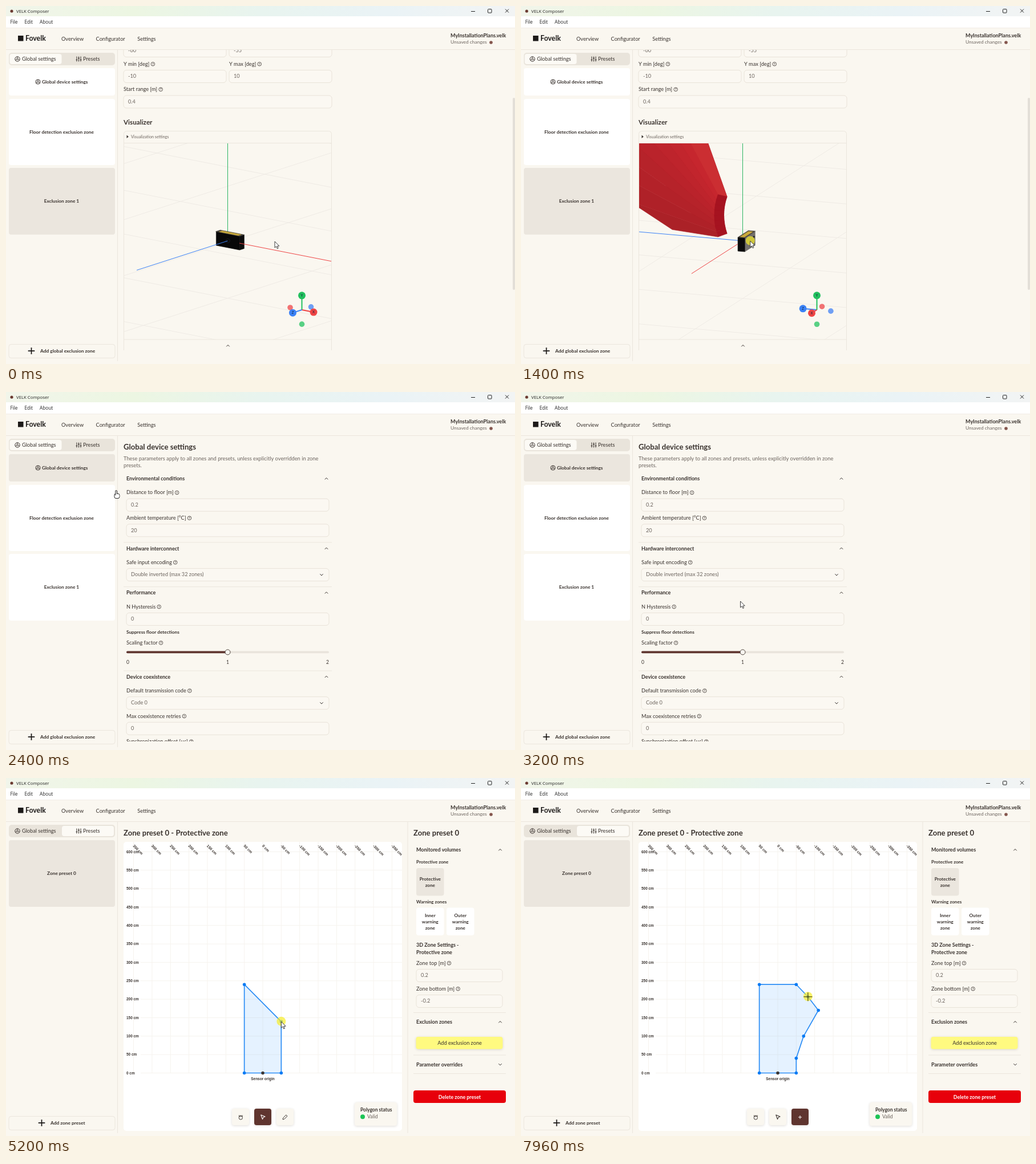
Recreate the animation shown at these times as an HTML page with a canvas. Size 892 px wide and 628 px high, loop 8000 ms.

```html
<!DOCTYPE html>
<html lang="en">
<head>
<meta charset="utf-8">
<title>Zone configurator</title>
<style>
  html, body { margin: 0; width: 100%; height: 100%; overflow: hidden; background: #faf7f0; }
  canvas { display: block; width: 892px; height: 628px; }
</style>
</head>
<body>
<canvas id="stage"></canvas>
<script>
const LOOP = 8000, W = 892, H = 628, RAD = Math.PI / 180;
const BG = '#faf7f0', INK = '#39322e', SOFT = '#6c645e', EDGE = '#ebe6dd', PICKED = '#ebe6de', BROWN = '#5f352f';
const canvas = document.getElementById('stage'), g = canvas.getContext('2d');
const ratio = window.devicePixelRatio || 1;
canvas.width = W * ratio;
canvas.height = H * ratio;

// ---------- drawing helpers ----------
function text(s, x, y, { size = 9.2, weight = 400, color = INK, align = 'left', font = 'Lato' } = {}) {
  g.font = `${weight} ${size}px "${font}", sans-serif`;
  g.textAlign = align;
  g.fillStyle = color;
  g.fillText(s, x, y + size * 0.35);
  return g.measureText(s).width;
}
const bold = (s, x, y, size = 9, more) => text(s, x, y, { size, weight: 700, ...more });
const row = (names, x, y, gap, style) => names.forEach(s => { x += text(s, x, y, style) + gap; });

function box(x, y, w, h, fill, edge, r = 4) {
  g.beginPath();
  g.roundRect(x, y, w, h, r);
  if (fill) { g.fillStyle = fill; g.fill(); }
  if (edge) { g.strokeStyle = edge; g.lineWidth = 1; g.stroke(); }
}
function path(points, color, width = 1, { fill, close } = {}) {
  g.beginPath();
  points.forEach(p => g.lineTo(...p));
  if (close || fill) g.closePath();
  if (fill) { g.fillStyle = fill; g.fill(); }
  if (color) { g.strokeStyle = color; g.lineWidth = width; g.stroke(); }
}
const line = (x1, y1, x2, y2, color = EDGE, width = 1) => path([[x1, y1], [x2, y2]], color, width);
function dot(x, y, r, fill, edge, width = 1) {
  g.beginPath();
  g.arc(x, y, r, 0, 7);
  if (fill) { g.fillStyle = fill; g.fill(); }
  if (edge) { g.strokeStyle = edge; g.lineWidth = width; g.stroke(); }
}
function plus(x, y, r, color, width) {
  line(x - r, y, x + r, y, color, width);
  line(x, y - r, x, y + r, color, width);
}
const chevron = (x, y, d = 1) => path([[x - 2.7, y + d * 1.4], [x, y - d * 1.4], [x + 2.7, y + d * 1.4]], INK);
function clipped(x, y, w, h, draw) {
  g.save();
  g.beginPath();
  g.rect(x, y, w, h);
  g.clip();
  draw();
  g.restore();
}
function raised(x, y, w, h, fill) {
  g.save();
  g.shadowColor = 'rgba(80,60,40,.18)';
  g.shadowBlur = 4;
  g.shadowOffsetY = 1;
  box(x, y, w, h, fill);
  g.restore();
}

// ---------- gestures: they move the pointer, the camera and the polygon ----------
const OX = 450, OY = 517.5, SCALE = 0.647;
const cm = (x, y) => [OX + x * SCALE, OY - y * SCALE];
const drag = (start, end, from, to = from) => ({ start, end, from, to, press: true });
const click = (time, x, y) => drag(time, time + 100, [x, y]);
const hover = (time, x, y) => ({ start: time, end: time, from: [x, y], to: [x, y] });

const orbit = drag(120, 1600, [471, 413], [391, 412]);
const openSettings = click(2160, 120, 136), openPresets = click(3560, 146, 96), openZone = click(3980, 136.5, 148);
const liftLeft = drag(4640, 4880, cm(-50, 50), cm(-50, 240));
const liftRight = drag(5060, 5360, cm(50, 50), cm(50, 240));
const pickPen = click(5720, 487, 592);
const inserts = [
  drag(6260, 6400, cm(50, 40)),
  drag(6700, 6960, cm(50, 100), cm(70, 100)),
  drag(7220, 7640, cm(60, 170), cm(110, 170)),
  drag(7880, LOOP, cm(80, 205), cm(82.5, 207.5))];
const gestures = [orbit, hover(1880, 401.5, 414.5), openSettings, hover(2500, 235, 195), hover(3200, 384.5, 367),
  openPresets, openZone, hover(4200, 136.5, 148), liftLeft, liftRight, pickPen, ...inserts];

const mix = (a, b, k) => a.map((v, i) => v + (b[i] - v) * k);
const smooth = k => k * k * (3 - 2 * k);
const during = ({ start, end, from, to }, t) =>
  mix(from, to, Math.min(1, Math.max(0, (t - start) / (end - start || 1))));

function pointerAt(t) {
  const i = gestures.findIndex(q => t < q.end), next = gestures[i], last = gestures[i - 1];
  if (t >= next.start || !last) return during(next, t);
  return mix(last.to, next.from, smooth((t - last.end) / (next.start - last.end)));
}

// ---------- form parts ----------
function label(s, x, y) {
  const cx = x + text(s, x, y) + 6;
  dot(cx, y + 0.3, 3.3, null, INK, 0.8);
  bold('?', cx, y + 0.4, 5.5, { align: 'center' });
}
function input(s, x, y, w, select) {
  box(x, y - 10.5, w, 22, '#fbf8f2', '#e9e3d9', 5);
  text(s, x + 8, y, { color: SOFT });
  if (select) chevron(x + w - 13, y + 0.5, -1);
}
function section(s, x, y, right, d = 1) {
  bold(s, x, y);
  chevron(right, y, d);
}
function card(s, y, h, picked) {
  box(5, y, 186, h, picked ? PICKED : '#fff');
  bold(s, 97.5, y + h / 2, 8.3, { align: 'center' });
}
function gear(x, y, r) {
  dot(x, y, r, null, INK);
  dot(x, y, r * 0.35, null, INK, 0.8);
  for (let a = 0.5; a < 6; a += Math.PI * 2 / 3) {
    const c = r * Math.cos(a), s = r * Math.sin(a);
    line(x + c * 0.4, y + s * 0.4, x + c, y + s, INK, 0.9);
  }
}

// ---------- frame of the window ----------
function chrome() {
  g.fillStyle = BG;
  g.fillRect(0, 0, W, H);
  const bar = g.createLinearGradient(0, 0, W, 0);
  ['#f1f5ea', '#ecf6e2', '#e8f4ef', '#eaf3f6', '#f2f4f4'].forEach((c, i) => bar.addColorStop(i / 4, c));
  g.fillStyle = bar;
  g.fillRect(0, 0, W, 18);
  g.fillStyle = '#fff';
  g.fillRect(0, 18, W, 20);
  line(0, 38.5, W, 38.5, '#f1ede6');
  line(0, 76.5, W, 76.5);
  line(195.5, 77, 195.5, 623);

  const system = { size: 8.2, font: 'Open Sans', color: '#222' };
  dot(10, 9, 2.6, '#6b3a31');
  text('VELK Composer', 18, 9, { ...system, size: 7.8 });
  row(['File', 'Edit', 'About'], 7.5, 28.5, 12, system);
  line(815, 9.5, 822, 9.5, '#222');
  box(844.5, 5.5, 6.5, 6.5, null, '#222', 1);
  line(875, 5.5, 881, 11.5, '#222');
  line(881, 5.5, 875, 11.5, '#222');

  box(21, 52, 9.5, 9.5, '#1d1a19', null, 0);
  bold('Fovelk', 34, 57, 12.3, { color: '#1d1a19' });
  row(['Overview', 'Configurator', 'Settings'], 97, 57.5, 21.5);
  bold('MyInstallationPlans.velk', 779, 51.5);
  text('Unsaved changes', 779, 63.5, { size: 8.4, color: SOFT });
  dot(850, 64, 2.8, '#85564d');
}

function sidebar(presets, picked) {
  box(5, 82, 186, 22, '#e9e4db', null, 5);
  box(presets ? 98 : 6.5, 84, 91, 18, '#fcfaf5', null, 4);
  gear(20, 93, 4.2);
  text('Global settings', 28, 93);
  for (let i = -1; i <= 1; i++) {
    const x = 127.5 + i * 3.5, y = 91.5 + Math.abs(i) * 3;
    line(x, 88.5, x, 97.5, INK);
    line(x - 1.5, y, x + 1.5, y, INK);
  }
  text('Presets', 135, 93);
  if (presets) {
    card('Zone preset 0', 109, 117, picked);
  } else {
    card('', 109, 48, picked === 0);
    gear(56, 133, 4);
    bold('Global device settings', 63, 133, 8.3);
    card('Floor detection exclusion zone', 163, 116);
    card('Exclusion zone 1', 284, 117, picked === 1);
  }
  box(5, 593.5, 186, 24, null, EDGE);
  plus(presets ? 62.5 : 44.5, 605, 5.8, '#1d1a19', 1.8);
  bold(presets ? 'Add zone preset' : 'Add global exclusion zone', presets ? 78 : 60, 605, 8.4);
}

// ---------- 3D visualizer (orthographic) ----------
function scene(turn, pitch) {
  const c = Math.cos(turn * RAD), s = Math.sin(turn * RAD), up = Math.cos(pitch * RAD), tilt = Math.sin(pitch * RAD);
  const projector = (cx, cy, k) => (x, y, z) => [cx + k * (x * c - z * s), cy + k * (tilt * (x * s + z * c) - y * up)];
  const P = projector(388.5, 412, 1);
  const face = (fill, ...corners) => path(corners, fill, 0.6, { fill });

  const far = 1200, floor = -104;
  for (let i = -far; i <= far; i += 240) {
    path([P(-far, floor, i), P(far, floor, i)], '#efebe5');
    path([P(i, floor, -far), P(i, floor, far)], '#efebe5');
  }

  // Exclusion beam: a spherical wedge that reaches farthest at its middle height
  const near = 195, low = -20, high = 20, left = 55, right = 60, step = 5;
  const reach = v => near * (2.85 + 6 * (1 - Math.abs(v) / high));
  const B = (h, v, r) => {
    const flat = r * Math.cos(h * RAD);
    return P(-r * Math.sin(h * RAD), flat * Math.sin(v * RAD), flat * Math.cos(v * RAD));
  };
  const strips = draw => { for (let v = low; v < high; v += step) draw(v, v + step); };
  const side = (h, shade) => strips((v, w) => face(shade(v), B(h, v, near), B(h, w, near), B(h, w, reach(w)), B(h, v, reach(v))));
  side(right, () => '#96071a');
  side(left, v => `hsl(357 68% ${43.5 + v * 0.18}%)`);
  face('#cb2e32', B(left, high, near), B(right, high, near), B(right, high, reach(high)), B(left, high, reach(high)));
  strips((v, w) => face('#a61320', B(left, v, near), B(right, v, near), B(right, w, near), B(left, w, near)));

  const axis = (from, to, color) => path([P(...from), P(...to)], color);
  const blue = () => axis([0, 0, 0], [0, 0, 259], '#3b82f6');
  axis([0, 0, 0], [0, 259, 0], '#2bb463');
  if (c < 0) blue();

  // Sensor body
  const L = -27, R = 26, h = 12.5, front = -0.6, back = -13.6, z = c > 0 ? front : back;
  const flat = (x1, x2, z1, z2) => [P(x1, h, z1), P(x2, h, z1), P(x2, h, z2), P(x1, h, z2)];
  const upright = (x, y, z) => [P(-x, -y, z), P(x, -y, z), P(x, y, z), P(-x, y, z)];
  face(c > 0 ? '#080808' : '#73706c', ...upright(R, h, z));
  face('#0b0b0b', P(R, -h, front), P(R, -h, back), P(R, h, back), P(R, h, front));
  face('#45403a', ...flat(L, R, front, back));
  face('#cbab3c', ...flat(-21, 21, -3, -11));
  if (c > 0) {
    dot(...P(0, 0, front), 3.5, null, '#1f2630', 0.7);
    blue();
  } else {
    dot(...P(-20, 4, back), 1.6, '#222');
  }
  axis([R, 0, 0], [259, 0, 0], '#ee4444');

  // Orientation gizmo
  const G = projector(518.5, 533, 26);
  [['X', [1, 0, 0], '#ef4444', '#f17272'], ['Y', [0, 1, 0], '#22c05e', '#59d084'], ['Z', [0, 0, 1], '#3b82f6', '#6f9ff4']]
    .flatMap(([name, v, color, pale]) => [{ name, v, color }, { v: v.map(n => -n), color: pale }])
    .map(o => ({ ...o, depth: up * (o.v[0] * s + o.v[2] * c) + tilt * o.v[1] }))
    .sort((m, n) => m.depth - n.depth)
    .forEach(({ name, v, color }) => {
      const p = G(...v);
      if (name) path([[518.5, 533], p], color, 2);
      dot(...p, name ? 6.5 : 4.8, color);
      if (name) text(name, ...p, { size: 6.5, color: '#10243a', align: 'center', font: 'Inter' });
    });
}

function visualizer(t) {
  const [x, y] = during(orbit, t), degrees = 360 / 345;
  clipped(197, 77, 695, 527, () => {
    input('-60', 206, 78, 180);
    input('-55', 391, 78, 180);
    label('Y min [deg]', 206, 101.5);
    label('Y max [deg]', 391, 101.5);
    input('-10', 206, 123, 180);
    input('10', 391, 123, 180);
    label('Start range [m]', 206, 146);
    input('0.4', 206, 167.5, 365);
    bold('Visualizer', 206, 204, 11.7);
    box(206.5, 219.5, 364, 420, null, EDGE, 5);
    path([[211.5, 226.5], [214.8, 229.2], [211.5, 232]], null, 1, { fill: INK });
    text('Visualization settings', 219, 229, { size: 7.2, color: SOFT });
    clipped(207, 240, 363, 345, () => scene(38 + (orbit.from[0] - x) * degrees, 14.6 - (orbit.from[1] - y) * degrees));
    line(206, 240.5, 571, 240.5);
    line(206, 585, 571, 585);
    chevron(389, 596);
  });
  box(888, 161, 4, 337, '#e3dfd8', null, 2);
}

// ---------- global device settings ----------
function deviceSettings() {
  bold('Global device settings', 206, 96, 13.1);
  const note = { size: 9.3, color: SOFT };
  text('These parameters apply to all zones and presets, unless explicitly overridden in zone', 206, 116.5, note);
  text('presets.', 206, 129, note);

  let y = 152;
  const x = 211, width = 355;
  const open = s => { section(s, x, y, 561.5); y += 24.2; };
  const close = () => { line(206, y - 1.5, 571, y - 1.5); y += 9; };
  const field = (s, value, select) => {
    label(s, x, y);
    input(value, x, y + 21.5, width, select);
    y += 44.6;
  };
  const slider = () => {
    bold('Suppress floor detections', x, y, 8.2);
    label('Scaling factor', x, y + 18.7);
    box(x, y + 33.6, width, 3.6, '#e9e4dc', null, 2);
    box(x, y + 33.6, width / 2, 3.6, BROWN, null, 2);
    dot(x + width / 2, y + 35.4, 4.5, BG, '#4a403b');
    for (let i = 0; i <= 2; i++) text(i, x + 2.5 + i * 175, y + 52.6, { size: 8.5, align: 'center' });
    y += 69.5;
  };
  clipped(197, 77, 695, 536, () => {
    open('Environmental conditions');
    field('Distance to floor [m]', '0.2');
    field('Ambient temperature [°C]', '20');
    close();
    open('Hardware interconnect');
    field('Safe input encoding', 'Double inverted (max 32 zones)', true);
    close();
    open('Performance');
    field('N Hysteresis', '0');
    slider();
    close();
    open('Device coexistence');
    field('Default transmission code', 'Code 0', true);
    field('Max coexistence retries', '0');
    field('Synchronization offset [µs]', '0');
  });
}

// ---------- preset editor ----------
const outline = t => [cm(-50, 0), during(liftLeft, t), during(liftRight, t),
  ...inserts.filter(q => t >= q.start).map(q => during(q, t)).reverse(), cm(50, 0)];

function plan(t) {
  const small = { font: 'Liberation Sans' }, faint = '#f6f3ee';
  for (let d = -350; d <= 350; d += 50) path([cm(d, 0), cm(d, 630)], faint);
  for (let d = 0; d <= 600; d += 50) {
    const [, y] = cm(0, d);
    line(236, y, 694, y, faint);
    bold(`${d} cm`, 211, y, 6.45, small);
  }
  for (let d = -350; d <= 350; d += 50) {
    g.save();
    g.translate(cm(-d, 0)[0], 118);
    g.rotate(Math.PI / 4);
    bold(`${d} cm`, 0, 0, 6.45, small);
    g.restore();
  }
  const points = outline(t);
  path(points, '#2b8df5', 1.7, { fill: 'rgba(0,125,255,.1)' });
  points.forEach(p => dot(...p, 2.8, '#087bf4'));
  dot(OX, OY, 2.8, '#3b3735');
  bold('Sensor origin', OX, 528, 6.45, { ...small, align: 'center' });
}

function tools(adding) {
  const tint = on => on ? '#fff' : INK;
  [false, !adding, adding].forEach((on, i) => raised(396 + i * 39, 580, 30, 29, on ? BROWN : BG));
  box(408.3, 593, 6, 6, null, INK, 2.5);
  for (let i = 0; i < 4; i++) line(408.5 + i * 1.9, 594, 408.5 + i * 1.9, 591.5, INK, 0.9);
  path([[446.8, 591], [454, 594], [451, 595.3], [449.5, 598.6]], tint(!adding), 1.1, { close: true });
  if (adding) plus(489, 595, 3, '#fff', 1);
  else path([[485, 599], [485.6, 596.4], [490.8, 591], [493, 593.2], [487.6, 598.4]], INK, 1, { close: true });
  raised(611, 569, 74, 41, BG);
  bold('Polygon status', 621, 582.5, 8.5);
  dot(625, 594.3, 4, '#1cc455');
  text('Valid', 633, 594, { size: 8.8, color: SOFT });
}

function zoneTile(name, x, y, fill) {
  box(x, y, 48.5, 48.5, fill);
  const words = name.split(' ');
  words.forEach((w, i) => bold(w, x + 24.3, y + 24.3 + (i - (words.length - 1) / 2) * 11, 8.1, { align: 'center' }));
}

function presetPanel() {
  line(704, 77, 704, 623);
  bold('Zone preset 0', 714, 96, 13.1);
  section('Monitored volumes', 719, 126, 866);
  bold('Protective zone', 719, 147.5, 8.1);
  zoneTile('Protective zone', 719, 158, PICKED);
  bold('Warning zones', 719, 217, 8.1);
  zoneTile('Inner warning zone', 719, 227.5, '#fff');
  zoneTile('Outer warning zone', 772, 227.5, '#fff');
  bold('3D Zone Settings -', 719, 292.5);
  bold('Protective zone', 719, 305.5);
  label('Zone top [m]', 719, 324.5);
  input('0.2', 719, 346, 151);
  label('Zone bottom [m]', 719, 369.5);
  input('-0.2', 719, 391, 151);
  [411.5, 486, 518.5].forEach(y => line(714, y, 876, y));
  section('Exclusion zones', 719, 428, 866);
  raised(718.5, 454, 152, 21.5, '#fffa80');
  text('Add exclusion zone', 795, 465, { align: 'center' });
  section('Parameter overrides', 719, 502.5, 866, -1);
  box(714, 548, 162, 22, '#e7000b');
  bold('Delete zone preset', 795, 559.5, 8.9, { color: '#fff', align: 'center' });
}

function editor(t) {
  bold('Zone preset 0 - Protective zone', 206, 96, 13.1);
  box(206, 112, 488, 507, '#fff', null, 5);
  clipped(206, 112, 488, 507, () => plan(t));
  tools(t >= pickPen.start);
  presetPanel();
}

// ---------- pointer ----------
function pointer(t) {
  const [x, y] = pointerAt(t), pressed = gestures.some(q => q.press && t >= q.start && t < q.end);
  if (pressed) dot(x, y - 0.5, 8, 'rgba(246,236,40,.7)');
  if (t >= pickPen.end && y < 575) {
    plus(x, y, 7.5, '#3a3810', 1.1);
  } else if (x < 196 || y > 575) {
    box(x - 2.5, y + 5, 9, 8.5, '#fff', '#222', 3);
    box(x - 0.6, y - 0.5, 2.6, 9, '#fff', '#222', 1.3);
    box(x, y + 6, 6, 6, '#fff', null, 2);
  } else {
    path([[0, 0], [0, 11], [2.6, 8.7], [4.4, 12.6], [6.1, 11.8], [4.4, 8.1], [7.8, 8]].map(([u, v]) => [x + u, y + v]),
      '#2b2b2b', 0.9, { fill: '#fff' });
  }
}

function draw(t) {
  g.setTransform(ratio, 0, 0, ratio, 0, 0);
  g.lineJoin = 'round';
  chrome();
  if (t < openSettings.end) {
    sidebar(false, 1);
    visualizer(t);
  } else if (t < openPresets.end) {
    sidebar(false, 0);
    deviceSettings();
  } else {
    sidebar(true, t >= openZone.start);
    if (t >= openZone.start) editor(t);
  }
  pointer(t);
}

const start = performance.now();
function tick() {
  draw((performance.now() - start) % LOOP);
  requestAnimationFrame(tick);
}
tick();
</script>
</body>
</html>
```
